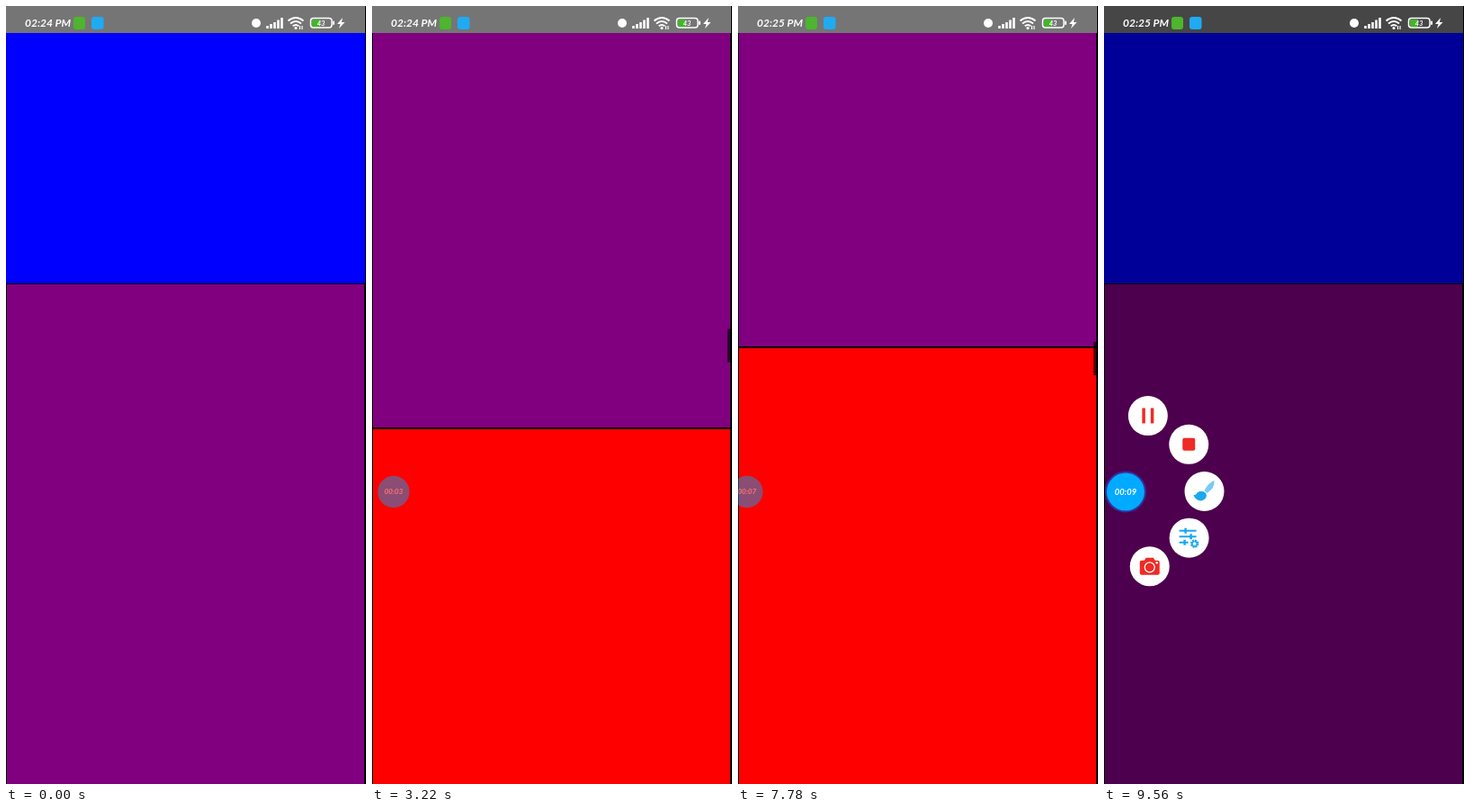
Animation, 400 px wide and 864 px high, one loop 9680 ms. Source, as an HTML page:

```html
<!DOCTYPE html>
<html lang="en">
<head>
<meta charset="utf-8">
<title>Scrolling pages</title>
<style>
  html, body { margin: 0; width: 100%; height: 100%; overflow: hidden; background: #000; }
  svg { display: block; width: 400px; height: 864px; }
  text { font-family: Lato, "Open Sans", sans-serif; font-style: italic; font-weight: 700; fill: #fff; }
  .red { fill: #f02a24; }
  .sky { fill: #1ba8ee; }
  .line { fill: none; stroke: #fff; }
</style>
</head>
<body>
<svg viewBox="0 0 400 864">
  <g id="pages"></g>
  <rect id="thumb" x="395" width="4" height="37" fill-opacity=".7"/>
  <rect width="400" height="30" fill="#757575"/>
  <rect x="399" width="1" height="864"/>
  <rect id="dim" width="400" height="864"/>

  <!-- status bar -->
  <text id="clock" x="21" y="23" font-size="12"></text>
  <rect x="75" y="12" width="13" height="14" rx="3" fill="#4db52f"/>
  <rect x="95" y="12" width="13.500" height="14" rx="3" fill="#20aaf2"/>
  <circle cx="278" cy="19" r="5" fill="#fff"/>
  <path d="M290.500 25v-3M294.500 25v-5M298.500 25v-7M302.500 25v-9.500M306.500 25v-12" class="line" stroke-width="2.600"/>
  <g class="line" stroke-width="2">
    <path d="M313.500 16.500Q322 9.500 330.500 16.500M316 19.500Q322 14.500 328 19.500M318.700 22.300Q322 19.700 325.300 22.300"/>
    <path d="M326.500 26v-4M329 22v4" stroke-width="1.200"/>
  </g>
  <circle cx="322" cy="24.500" r="1.500" fill="#fff"/>
  <rect x="340" y="15" width="9" height="8" fill="#43b52b"/>
  <rect x="338.500" y="13.500" width="23.500" height="10.500" rx="3" class="line" stroke-width="1.500"/>
  <rect x="363" y="16.500" width="2" height="4.500" rx="1" fill="#fff"/>
  <text x="350" y="21.500" font-size="7.500" text-anchor="middle">43</text>
  <path d="M374 13l-6 7h3.500l-1.500 5 6.500-7h-3.600z" fill="#fff"/>

  <g id="menu">
    <g>
      <circle r="22" fill="#fff"/>
      <path class="red" d="M-6.500-8.500h3.500v17h-3.500zM3-8.500h3.500v17h-3.500z"/>
    </g>
    <g>
      <circle r="22" fill="#fff"/>
      <rect class="red" x="-7" y="-7" width="14" height="14" rx="2"/>
    </g>
    <g>
      <circle r="22" fill="#fff"/>
      <path class="sky" d="M-12 4C-8 5-9-1-3 0C3 0 4 6 0 9C-4 12-10 10-12 4Z"/>
      <path class="sky" d="M0-1Q5-10 11-12Q12-4 3 2Z" opacity=".6"/>
    </g>
    <g>
      <circle r="22" fill="#fff"/>
      <path d="M-11-8H8M-11-1.500H8M-11 5H-1" stroke="#1ba8ee" stroke-width="2"/>
      <path d="M-4-11v6M2-4.500v6M-5 2v6" stroke="#1ba8ee" stroke-width="2.500"/>
      <circle cx="6" cy="6.500" r="3.500" fill="none" stroke="#1ba8ee" stroke-width="2.500" stroke-dasharray="1.800 .95"/>
      <circle cx="6" cy="6.500" r="2.700" fill="none" stroke="#1ba8ee" stroke-width="1.500"/>
    </g>
    <g>
      <circle r="22" fill="#fff"/>
      <path class="red" d="M-9-6.500h3l2-3h8l2 3h3q2 0 2 2v12q0 2-2 2h-18q-2 0-2-2v-12q0-2 2-2z"/>
      <circle cy="1" r="5.500" class="line" stroke-width="1.300"/>
      <circle cx="8" cy="-4" r="1.200" fill="#fff"/>
    </g>
  </g>

  <g id="bubble">
    <circle id="ring" r="23" fill="#1668ff" fill-opacity=".45"/>
    <circle r="21" fill="#00aaff"/>
    <text id="timer" y="3.500" font-size="9.500" text-anchor="middle"></text>
  </g>
</svg>
<script>
const $ = id => document.getElementById(id);
const LOOP = 9680, FPS = 9, TOP = 30, VIEW = 834;
const BLUE = 278, PURPLE = 557, CYCLE = BLUE + PURPLE + VIEW;
const RED1 = BLUE + PURPLE, RED2 = RED1 + CYCLE, END = 3 * CYCLE;

// [time, scroll offset]
const scrollKeys = [
  [0, 0], [1000, 0], [1222, RED1], [1556, RED1], [2000, 0], [2222, 0],
  [2556, RED1], [3000, CYCLE], [3111, CYCLE], [3222, 2064], [3333, RED2],
  [5333, RED2], [5778, RED1], [6778, RED1], [7222, RED2],
  [7667, RED2], [8222, 754], [8444, 0], [LOOP, 0]
];
const menuAngles = [-73.5, -36.6, 0, 36.2, 72.2];

const clamp = x => Math.min(1, Math.max(0, x));
const ramp = (t, a, b) => clamp((t - a) / (b - a));
const ease = (t, a, b) => { const x = ramp(t, a, b); return x * x * (3 - 2 * x); };

const bordered = (y, height, color) =>
  `<rect x=".5" y="${y + .5}" width="398" height="${height - 1}" fill="${color}" stroke="#000"/>`;

let markup = '';
for (let y = TOP; y <= TOP + END; y += CYCLE) {
  markup += `<rect y="${y}" width="399" height="${BLUE}" fill="#00f"/>`
    + bordered(y + BLUE, PURPLE, '#800080')
    + bordered(y + RED1, VIEW, '#f00');
}
$('pages').innerHTML = markup;

function scrollAt(t) {
  let pos = 0, lastMove = -1e4;
  for (let i = 1; i < scrollKeys.length; i++) {
    const [t0, s0] = scrollKeys[i - 1], [t1, s1] = scrollKeys[i];
    if (t < t0) break;
    pos = s0 + (s1 - s0) * ramp(t, t0, t1);
    if (s0 !== s1 && t > t0) lastMove = Math.min(t, t1);
  }
  return { pos: Math.round(pos), thumb: 1 - ramp(t - lastMove, 350, 650) };
}

function draw(t) {
  const { pos, thumb } = scrollAt(t);
  $('pages').setAttribute('transform', `translate(0 ${-pos})`);
  $('thumb').setAttribute('y', TOP + pos / END * (VIEW - 37));
  $('thumb').setAttribute('opacity', thumb);

  $('clock').textContent = t < 7770 ? '02:24 PM' : '02:25 PM';
  $('timer').textContent = '00:0' + Math.max(0, Math.floor((t - 100) / 1000));

  const idle = ease(t, 2500, 3000) - ease(t, 8750, 8950);
  const x = 24 - 14 * (ease(t, 3700, 4220) - ease(t, 8750, 8950));
  $('bubble').setAttribute('transform', `translate(${x} 539.500) scale(${1 - .16 * idle})`);
  $('bubble').setAttribute('opacity', ramp(t, 50, 400) * (1 - .55 * idle));
  $('ring').setAttribute('opacity', 1 - idle);

  const open = ease(t, 9000, 9450);
  $('dim').setAttribute('opacity', .4 * ease(t, 8950, 9250));
  $('menu').setAttribute('opacity', ramp(t, 9000, 9150));
  [...$('menu').children].forEach((item, i) => {
    const a = menuAngles[i] * Math.PI / 180, r = 87.5 * open;
    item.setAttribute('transform',
      `translate(${24 + r * Math.cos(a)} ${539 + r * Math.sin(a)}) scale(${open})`);
  });
}

const start = performance.now();
function tick() {
  const t = (performance.now() - start) % LOOP;
  draw(Math.floor((t + 5) * FPS / 1000) * 1000 / FPS);
  requestAnimationFrame(tick);
}
tick();
</script>
</body>
</html>
```
